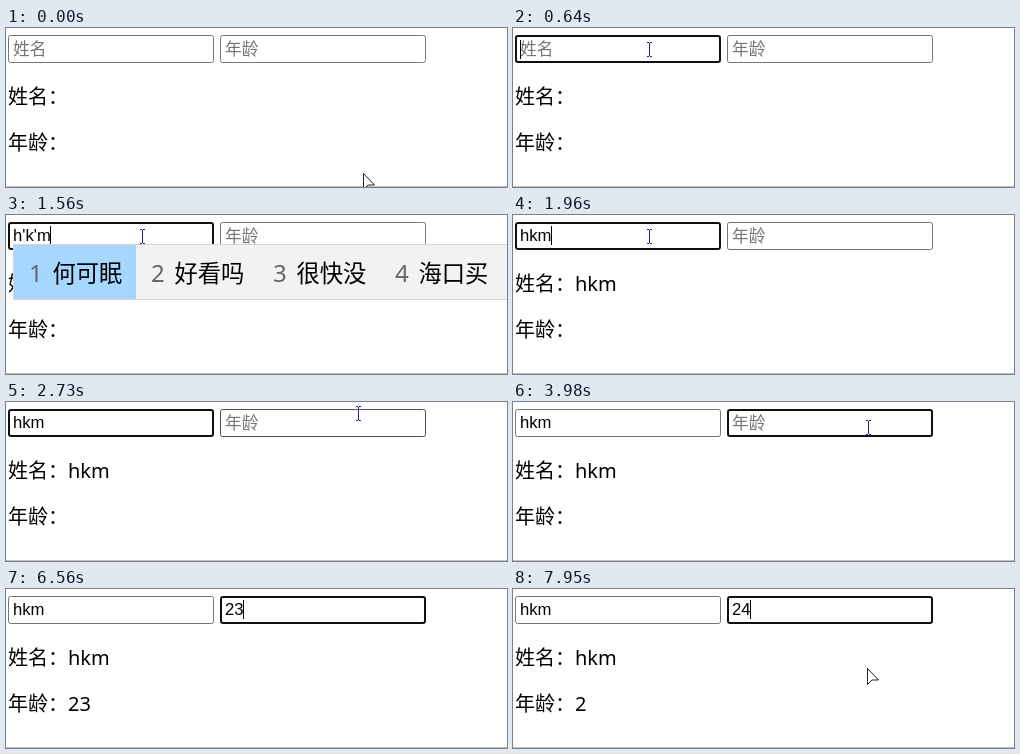
An HTML page that plays this animation: 501 by 159 pixels, repeating every 8000 ms.

```html
<!DOCTYPE html>
<html lang="zh">
<head>
<meta charset="utf-8">
<style>
  html, body { margin: 0; width: 100%; height: 100%; overflow: hidden; background: #fff; }
  svg { display: block; }
  text { white-space: pre; }
  .page { font: 20px "Noto Sans", "Noto Sans CJK SC", sans-serif; }
  .field { font: 16.67px "Liberation Sans", "Noto Sans CJK SC", sans-serif; }
  .hint { fill: #757575; }
  .ime { font: 23.3px "Noto Sans CJK SC", sans-serif; }
  .index { font: 24px "Noto Sans", sans-serif; fill: #666; }
</style>
</head>
<body>
<svg id="stage" width="501" height="159" viewBox="0 0 501 159"></svg>
<script>
const LOOP = 8000;
const stage = document.getElementById("stage");

// Each track is a list of [start time, ...values]; values hold until the next entry.
const nameInput = [[0, ""], [1330, "h"], [1490, "h'k"], [1560, "h'k'm"], [1960, "hkm"]];
const nameOutput = [[0, ""], [1960, "hkm"]];
const ageInput = [[0, ""], [4210, "2"], [4460, "23"], [7160, "2"], [7950, "24"]];
const ageOutput = [[0, ""], [4290, "2"], [4530, "23"], [7250, "2"]];
const focus = [[0, -1], [550, 0], [3420, 1]];
const caret = [
  [0, false], [640, true], [1100, false], [1330, true], [2420, false], [2960, true],
  [3420, true], [3910, false], [4210, true], [5000, false], [5460, true], [6010, false],
  [6560, true], [7090, false], [7160, true], [7630, false], [7950, true]
];
const candidates = [
  [0, ""],
  [1330, "和 好 还 会 后 或 很"],
  [1490, "好看 很快 还款 海口 回看"],
  [1560, "何可眠 好看吗 很快没 海口买"],
  [1960, ""]
];
const pointer = [
  [0, "arrow", 357, 145], [70, "arrow", 230, 60], [150, "beam", 136, 21],
  [2650, "beam", 260, 18], [2730, "beam", 352, 11], [2880, "beam", 354, 11],
  [2960, "beam", 355, 11], [3190, "beam", 356, 12], [3420, "beam", 343, 7],
  [3590, "beam", 366, 19], [3910, "beam", 361, 12], [3980, "beam", 355, 25],
  [4700, "beam", 362, 28], [4770, "arrow", 375, 50], [4850, "arrow", 390, 85],
  [4930, "arrow", 402, 110], [5000, "arrow", 407, 128], [5080, "arrow", 407, 140],
  [5160, "arrow", 405, 150], [5230, "none", 0, 0],
  [6630, "arrow", 399, 136], [6710, "arrow", 380, 105], [6790, "arrow", 360, 84],
  [6860, "arrow", 354, 79]
];

const at = (track, t) => track.findLast(entry => entry[0] <= t).slice(1);

const text = (x, y, cls, content) => `<text x="${x}" y="${y}" class="${cls}">${content}</text>`;
const rect = (x, y, w, h, attrs) => `<rect x="${x}" y="${y}" width="${w}" height="${h}" ${attrs}/>`;

// Advance widths in em for the letters typed into the fields.
const ADVANCE = { h: .556, k: .5, m: .833, "'": .191 };
const typedWidth = s => [...s].reduce((sum, c) => sum + (ADVANCE[c] ?? .556) * 16.67, 0);

function field(x, value, hint, focused, hovered, caretOn) {
  const frame = focused
    ? rect(x + 1, 8, 204, 26, 'rx="2" fill="#fff" stroke="#101010" stroke-width="2"')
    : rect(x + .5, 7.5, 205, 27, `rx="2" fill="#fff" stroke="${hovered ? "#4f4f4f" : "#767676"}"`);
  const label = value ? text(x + 5, 26, "field", value) : text(x + 5, 26.5, "field hint", hint);
  const caretX = Math.floor(x + 5 + typedWidth(value));
  const bar = focused && caretOn ? rect(caretX, value ? 11 : 12, 1, 19, 'fill="#000"') : "";
  return frame + label + bar;
}

function candidateBar(list) {
  if (!list) return "";
  const words = list.split(" ");
  const pitch = 55.25 + 22.25 * words[0].length;
  const items = words.map((word, i) =>
    text(23 + i * pitch, 67, "index", i + 1) + text(46.5 + i * pitch, 67, "ime", word));
  return rect(7.5, 29.5, 500, 55, 'fill="#f2f2f2" stroke="#d4d4d4"')
    + rect(8, 30, Math.floor(pitch), 54, 'fill="#a6d8ff"') + items.join("");
}

function cursor([kind, x, y]) {
  if (kind === "beam")
    return `<path d="M${x - 2} ${y - 6.5}h2m1 0h2M${x - 2} ${y + 7.5}h2m1 0h2M${x + .5} ${y - 6}v13" fill="none" stroke="#1c1c9c"/>`;
  if (kind === "arrow")
    return `<path d="M${x + .5} ${y + .5}v16l4.5 -4.5h6.5z" fill="#fff" stroke="#222"/>`;
  return "";
}

function draw(t) {
  const [focused] = at(focus, t), [caretOn] = at(caret, t), mouse = at(pointer, t);
  const hovers = x => mouse[0] === "beam" && mouse[1] > x && mouse[1] < x + 206;
  const input = (i, x, track, hint) =>
    field(x, at(track, t)[0], hint, focused === i, hovers(x), caretOn);
  stage.innerHTML =
    rect(0, 158, 501, 1, 'fill="#c0c0c0"')
    + input(0, 2, nameInput, "姓名") + input(1, 214, ageInput, "年龄")
    + text(2, 76, "page", "姓名：" + at(nameOutput, t)[0])
    + text(2, 122, "page", "年龄：" + at(ageOutput, t)[0])
    + candidateBar(at(candidates, t)[0])
    + cursor(mouse);
}

const start = performance.now();
function tick() {
  draw((performance.now() - start) % LOOP);
  requestAnimationFrame(tick);
}
tick();
</script>
</body>
</html>
```
